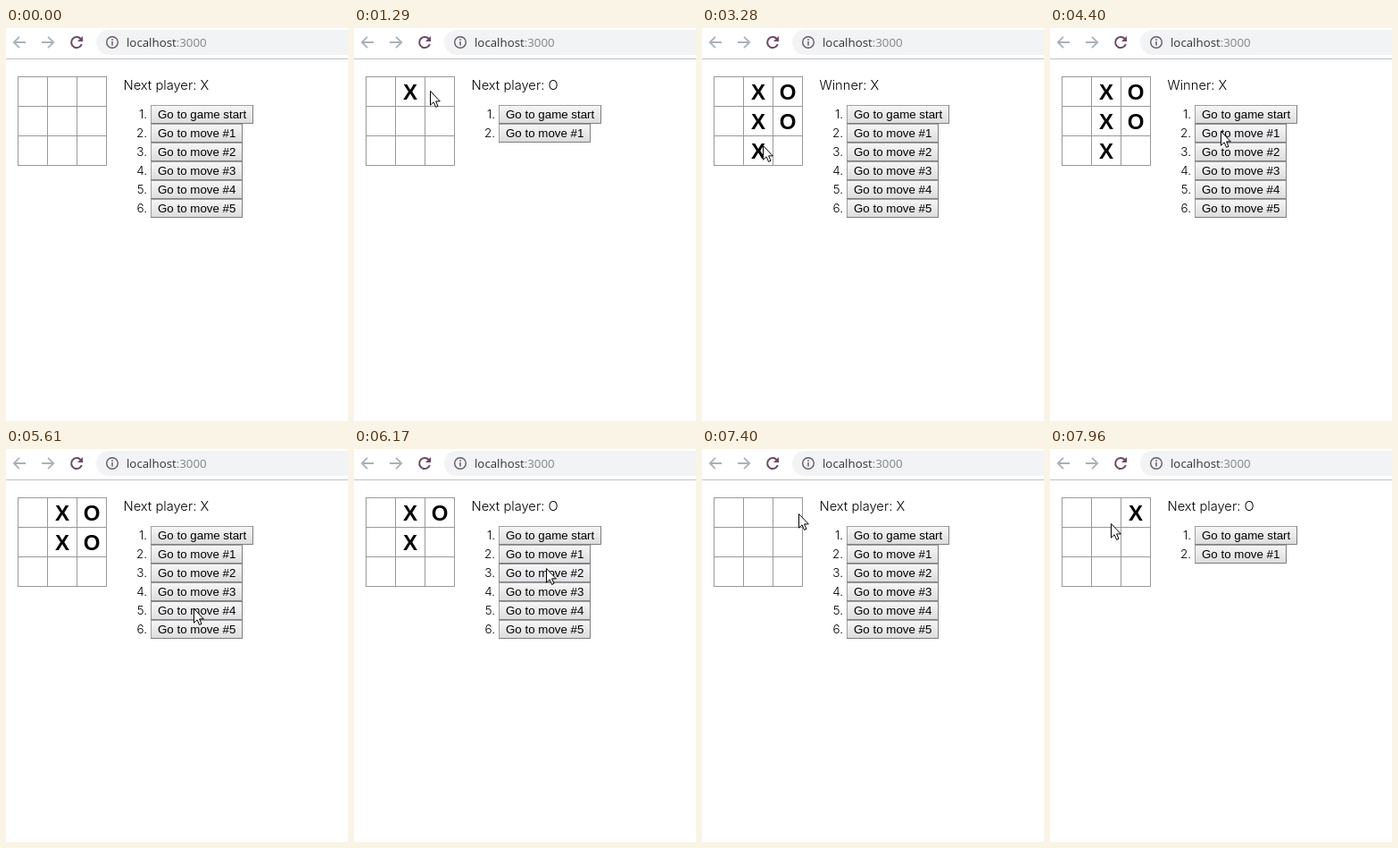
An HTML page that plays this animation: 383 by 439 pixels, repeating every 8 s.

```html
<!DOCTYPE html>
<html lang="en">
<head>
<meta charset="utf-8">
<title>Tic-tac-toe</title>
<style>
  html, body { margin: 0; width: 100%; height: 100%; overflow: hidden; background: #fff; }
  svg { display: block; }
  .url { font: 13.3px "Open Sans", sans-serif; fill: #303338; }
  .body { font: 300 14.7px Inter, sans-serif; fill: #000; }
  .num { font-size: 13.5px; text-anchor: end; }
  .mark { font: bold 24px "Liberation Sans", Arial, sans-serif; text-anchor: middle; }
  .label { font: 13.333px "Liberation Sans", Arial, sans-serif; }
  .face { fill: url(#face); stroke: #a0a0a0; }
  .edge { fill: none; stroke: #7e7e7e; }
  .hover .face { fill: url(#lit); stroke: #8c8c8c; }
</style>
</head>
<body>
<svg width="383" height="439" viewBox="0 0 383 439">
  <defs>
    <linearGradient id="face" x2="0" y2="1"><stop stop-color="#f6f6f6"/><stop offset="1" stop-color="#dcdcdc"/></linearGradient>
    <linearGradient id="lit" x2="0" y2="1"><stop stop-color="#f7f6f8"/><stop offset="1" stop-color="#dfdfe3"/></linearGradient>
  </defs>
  <rect width="383" height="439" fill="#fff"/>
  <rect x="101" y="2" width="300" height="28" rx="14" fill="#f1f3f4"/>
  <path d="M0 34.5H383" stroke="#c4c2c4"/>
  <g fill="none" stroke-width="1.8">
    <path id="back" d="M22 16H9.5M15 9.8L8.8 16L15 22.2" stroke="#a9b2ba"/>
    <use href="#back" transform="matrix(-1 0 0 1 62 0)"/>
    <path d="M83.6 12A6 6 0 1 0 84.8 18" stroke="#6b4866" stroke-width="2"/>
    <path d="M86 9V15H80Z" fill="#6b4866"/>
    <circle cx="119" cy="16" r="6.3" stroke="#665a68" stroke-width="1.4"/>
    <path d="M119 15V19.5M119 12.3V13.9" stroke="#665a68" stroke-width="1.5"/>
  </g>
  <text class="url" x="135" y="21">localhost<tspan fill="#80868b">:3000</tspan></text>
  <g id="board"></g>
  <text id="status" class="body" x="131.5" y="69"></text>
  <g id="history"></g>
  <g id="pointer">
    <circle id="press" cx="-.5" cy="1" r="12" fill="#ff0" fill-opacity=".5"/>
    <path d="M.5 .5V16.2L4.1 12.8L6.6 18.4L9 17.3L6.6 11.9H11.3Z" fill="#fff" stroke="#000"/>
  </g>
</svg>
<script>
const LOOP = 8000, START = 50, TICK = 78, PRESS = 175;
const SQUARE = 33, ROW = 21;

// What the user does; each click counts when the button is released
const hover = (time, x, y) => ({ time, x, y, press: 0 });
const play = (time, square) => ({
  time, square, press: PRESS,
  x: 29 + 34 * (square % 3), y: 70 + 31 * Math.floor(square / 3)
});
const jump = (time, move) => ({
  time, move, press: PRESS, x: 221 - 2.75 * move, y: 88 + 22.5 * move
});

const actions = [
  hover(START, 289, 415),
  play(900, 1), play(1555, 2), play(2220, 4), play(2560, 5), play(3110, 7),
  hover(3600, 191, 115), hover(4800, 200, 195),
  jump(5580, 4), jump(5980, 3), jump(6320, 2), jump(6530, 1), jump(6870, 0),
  play(7630, 2), hover(7920, 68, 83)
];
const lines = ["012", "345", "678", "036", "147", "258", "048", "246"];

const [board, status, history, pointer, press] =
  ["board", "status", "history", "pointer", "press"].map(id => document.getElementById(id));

function add(parent, tag, attrs, text = "") {
  const node = document.createElementNS("http://www.w3.org/2000/svg", tag);
  for (const key in attrs) node.setAttribute(key, attrs[key]);
  node.textContent = text;
  return parent.appendChild(node);
}

for (let i = 0; i < 4; i++) {
  const at = SQUARE * i;
  add(board, "path", { d: `M13 ${54.5 + at}H113M${13.5 + at} 54V154`, stroke: "#999" });
}

const squares = Array.from({ length: 9 }, (_, i) => add(board, "text", {
  class: "mark", x: 30 + SQUARE * (i % 3), y: 80 + SQUARE * Math.floor(i / 3)
}));

const buttons = Array.from({ length: 6 }, (_, i) => {
  const node = add(history, "g", {});
  const top = 86 + ROW * i, right = i ? 265 : 277;
  add(node, "text", { class: "body num", x: 158, y: top + 15 }, `${i + 1}.`);
  add(node, "rect", { class: "face", x: 162.5, y: top + .5, width: right - 163, height: 20 });
  add(node, "path", { class: "edge", d: `M162 ${top + 20.5}H${right - .5}V${top}` });
  add(node, "text", { class: "label", x: 170, y: top + 15 }, i ? `Go to move #${i}` : "Go to game start");
  return { node, top, right };
});

function gameAt(t) {
  let moves = [1, 2, 4, 5, 7], shown = 0;
  for (const { time, square, move } of actions) {
    if (time > t) break;
    if (square !== undefined) {
      moves = [...moves.slice(0, shown), square];
      shown = moves.length;
    } else if (move !== undefined) shown = move;
  }
  return { moves, shown };
}

// Rest at the last spot, then glide so as to arrive for the next press
function pointerAt(t) {
  const i = Math.max(1, actions.findIndex(a => a.time > t));
  const last = actions.at(-1);
  if (t >= last.time) return { x: last.x, y: last.y, down: false };
  const from = actions[i - 1], to = actions[i];
  const arrive = to.time - to.press;
  const travel = Math.max(400, 2 * Math.hypot(to.x - from.x, to.y - from.y));
  const leave = Math.max(from.time, arrive - travel);
  const u = Math.min(1, Math.max(0, (t - leave) / (arrive - leave)));
  const glide = key => Math.round(from[key] + (to[key] - from[key]) * u * u * (3 - 2 * u));
  return { x: glide("x"), y: glide("y"), down: t >= arrive };
}

const show = (node, on) => { node.style.display = on ? "" : "none"; };

function render(time) {
  const t = START + Math.floor((time - START) / TICK) * TICK;
  const { moves, shown } = gameAt(t);
  const marks = squares.map((_, i) => {
    const turn = moves.indexOf(i);
    return turn >= 0 && turn < shown ? "XO"[turn % 2] : "";
  });
  squares.forEach((square, i) => { square.textContent = marks[i]; });
  const won = lines.find(([a, b, c]) => marks[a] && marks[a] === marks[b] && marks[a] === marks[c]);
  status.textContent = won ? `Winner: ${marks[won[0]]}` : `Next player: ${"XO"[shown % 2]}`;

  const { x, y, down } = pointerAt(t);
  buttons.forEach(({ node, top, right }, i) => {
    show(node, i <= moves.length);
    const over = x >= 162 && x < right && y >= top && y < top + ROW;
    node.setAttribute("class", over ? "hover" : "");
  });
  show(pointer, t >= START);
  show(press, down);
  pointer.setAttribute("transform", `translate(${x} ${y})`);
}

const begin = performance.now();
function frame() {
  render((performance.now() - begin) % LOOP);
  requestAnimationFrame(frame);
}
frame();
</script>
</body>
</html>
```
